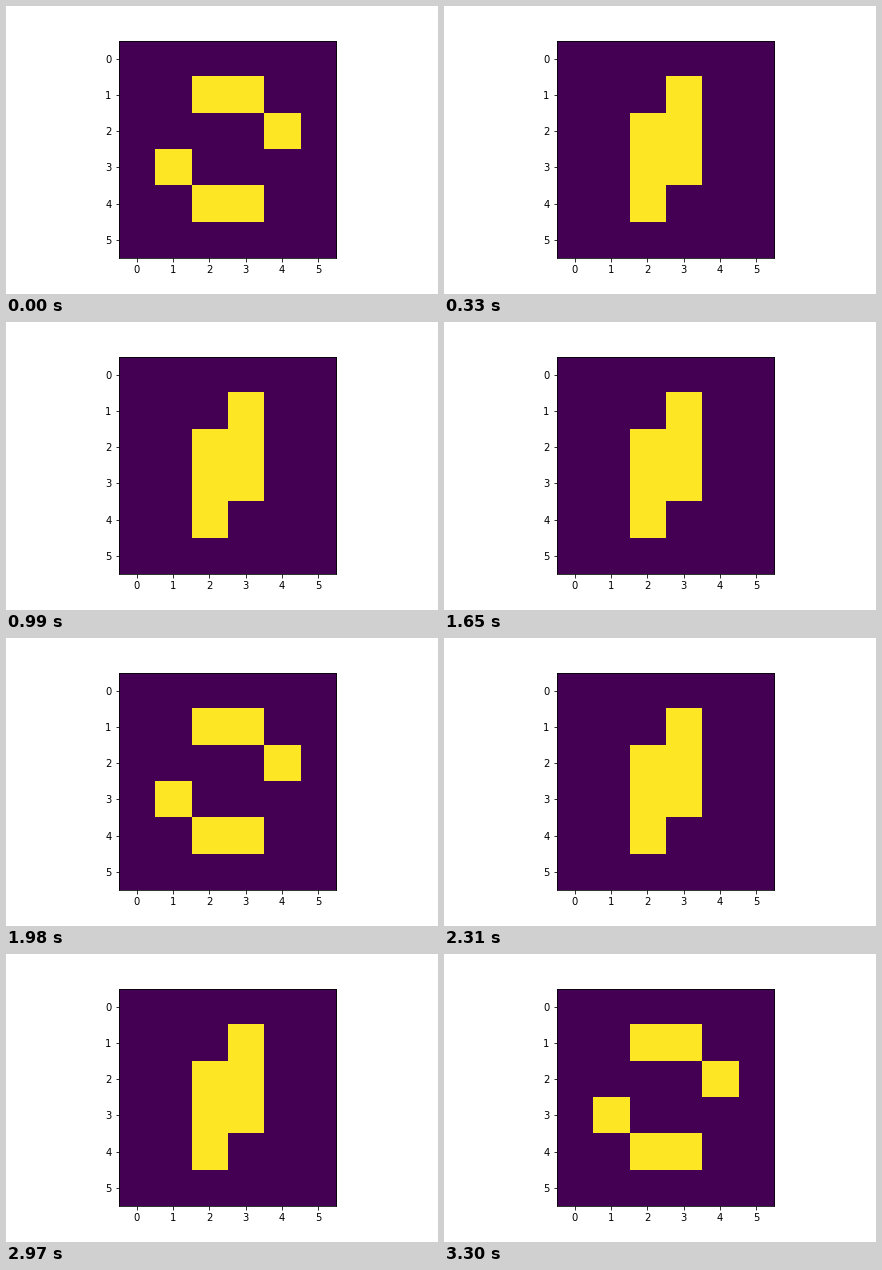
Recreate the animation shown at these times as a matplotlib script. Size 432 px wide and 288 px high, loop 3.63 s.

```python
import numpy as np
import matplotlib.pyplot as plt
from matplotlib.animation import FuncAnimation

SIZE = 6
FRAMES = 11
INTERVAL = 330
START = [(1, 2), (1, 3), (2, 4), (3, 1), (4, 2), (4, 3)]


def step(grid):
    """Advance the Game of Life by one generation on a wrapped grid."""
    shifts = [(dy, dx) for dy in (-1, 0, 1) for dx in (-1, 0, 1) if dy or dx]
    neighbours = sum(np.roll(grid, s, axis=(0, 1)) for s in shifts)
    return ((neighbours == 3) | ((grid == 1) & (neighbours == 2))).astype(int)


grid = np.zeros((SIZE, SIZE), dtype=int)
grid[tuple(zip(*START))] = 1
generations = [grid]
for _ in range(FRAMES - 1):
    generations.append(step(generations[-1]))

plt.rcParams.update({"font.family": "DejaVu Sans", "font.size": 10})
fig, ax = plt.subplots(figsize=(6, 4), dpi=72, facecolor="white")
fig.subplots_adjust(left=0.125, right=0.9, bottom=0.125, top=0.88)
image = ax.imshow(grid, cmap="viridis", vmin=0, vmax=1,
                  interpolation="nearest")
ax.set_xticks(range(SIZE))
ax.set_yticks(range(SIZE))


def update(frame):
    image.set_data(generations[frame])
    return [image]


anim = FuncAnimation(fig, update, frames=FRAMES, interval=INTERVAL,
                     repeat=True, repeat_delay=0, blit=False)
plt.show()
```
